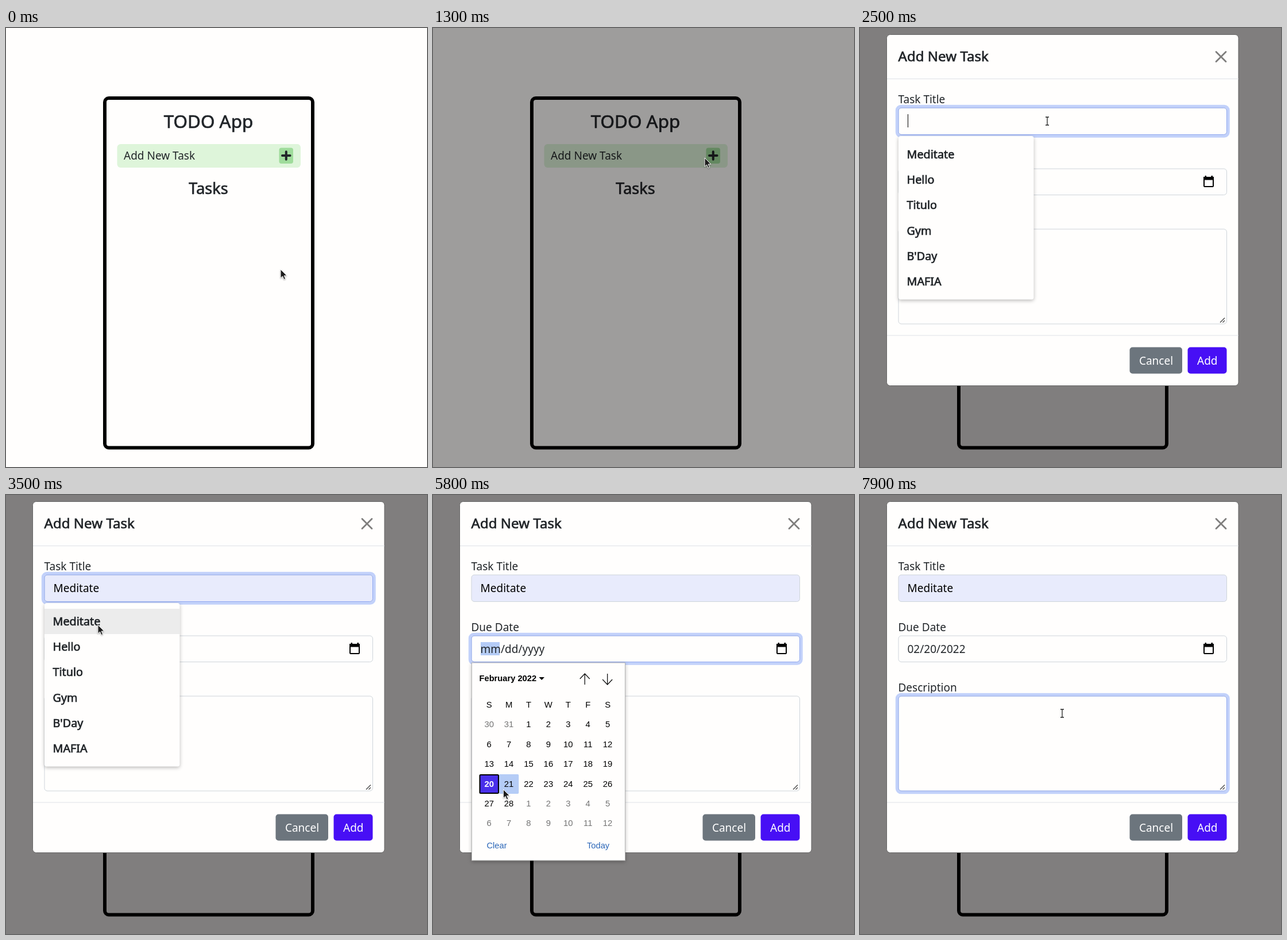
An HTML page for the animation above (8 s loop, 733x764 px).

```html
<!DOCTYPE html>
<html lang="en">
<head>
<meta charset="utf-8">
<title>Task list</title>
<style>
  html, body { margin: 0; width: 100%; height: 100%; overflow: hidden; background: #fffefd; }
  svg { display: block; width: 733px; height: 764px; }
  text { font: 19px "Noto Sans", "Open Sans", sans-serif; fill: #212529; white-space: pre; }
  .mid { text-anchor: middle; }
  .h1, .h2, .h3, .item { stroke: #212529; stroke-width: .7px; }
  .h1 { font-size: 31.4px; }
  .h2 { font-size: 27px; }
  .h3 { font-size: 24.1px; }
  .item { font-size: 19.8px; }
  .typed { fill: #000; }
  .btn { fill: #fff; }
  .line { stroke: #dee2e6; }
  .box { fill: #fffefd; stroke: #ced4da; }
  .ring { fill: none; stroke: #c2d1fa; stroke-width: 5px; }
  .edge { fill: none; stroke: #90a8f0; }
  .caret { fill: #000; }
  .pop { filter: drop-shadow(0 2px 3px rgba(0, 0, 0, .28)); }
  .cal text { font: 14.9px "Liberation Sans", Arial, sans-serif; fill: #000; }
  .cal .month { font-weight: bold; font-size: 14.7px; }
  .cal .other { fill: #757575; }
  .cal .link { fill: #2a66b8; font-size: 14.7px; }
  .cal .chosen { fill: #fff; font-weight: bold; }
  .thin { fill: none; stroke: #111; stroke-width: 1.3px; }
  #arrow { fill: #1c1c1c; stroke: #fff; filter: drop-shadow(0 1px 1px rgba(0, 0, 0, .35)); }
  #beam { fill: none; stroke: #222; stroke-width: 1.3px; }
</style>
</head>
<body>
<svg viewBox="0 0 733 764">
  <rect width="733" height="764" fill="#fffefd"/>

  <g id="app">
    <rect x="172" y="122" width="362" height="608.5" rx="7" fill="none" stroke="#000" stroke-width="6"/>
    <text class="h1 mid" x="352.5" y="173.5">TODO App</text>
    <rect x="193.5" y="202" width="319.5" height="41" rx="6" fill="#def5da"/>
    <text x="205" y="229">Add New Task</text>
    <rect x="475.5" y="208.5" width="24.5" height="27.5" rx="4" fill="#9fdc9b"/>
    <path d="M481 222h13.6M487.8 215.2v13.6" stroke="#212529" stroke-width="4" stroke-linecap="round"/>
    <text class="h2 mid" x="352.5" y="289">Tasks</text>
  </g>

  <rect id="shade" width="733" height="764" fill="#030100"/>

  <g id="modal">
    <rect x="46.5" y="11.5" width="612.5" height="611" rx="6" fill="#fffefd" stroke="#666"/>
    <text class="h3" x="66.5" y="58">Add New Task</text>
    <path d="M620 41.5l17 17m0-17l-17 17" stroke="#7f7e7d" stroke-width="2.8" stroke-linecap="round"/>
    <path class="line" d="M47 88.5h612M47 535h612"/>

    <text x="66.5" y="131">Task Title</text>
    <text x="66.5" y="237">Due Date</text>
    <text x="66.5" y="342">Description</text>
    <g id="fields"></g>

    <text id="title" class="typed" x="82.5" y="169">Meditate</text>
    <rect id="month" x="83" y="256" width="33" height="23" fill="#b5ccf6"/>
    <text id="date" x="82.5" y="274.5"></text>
    <rect x="599" y="260" width="16" height="16" rx="1" fill="none" stroke="#000" stroke-width="2"/>
    <path d="M598 259h18v5.5h-18zM600.5 257h2.5v3h-2.5zM611.5 257h2.5v3h-2.5z"/>
    <path d="M627 512.5l8-8M631.5 512.5l3.5-3.5" stroke="#444" stroke-width="1.3"/>
    <rect id="titleCaret" class="caret" x="83" y="150" width="1" height="23"/>
    <rect id="noteCaret" class="caret" x="83" y="362" width="1" height="22"/>

    <rect x="469.5" y="555.5" width="91.5" height="46" rx="5" fill="#6c757d"/>
    <text class="btn mid" x="515.5" y="586">Cancel</text>
    <rect x="570.5" y="555.5" width="68" height="46" rx="5" fill="#470ff5"/>
    <text class="btn mid" x="604.8" y="586">Add</text>
  </g>

  <g id="list">
    <rect class="pop" x="67" y="188" width="235.5" height="284.5" rx="4" fill="#fffefd"/>
    <rect id="hover" x="67" y="198" width="235.5" height="44" fill="#ececec"/>
  </g>

  <g id="cal" class="cal">
    <rect class="pop" x="67.5" y="292" width="267" height="344" fill="#fffefd" stroke="#b4b4b4"/>
    <text class="month" x="80.5" y="324">February 2022</text>
    <path d="M184.5 317h9.5l-4.75 5z"/>
    <path class="thin" d="M264.3 330v-19m-8.5 9l8.5-9l8.5 9M303.7 311v19m-8.5-9l8.5 9l8.5-9"/>
    <rect id="cell" y="486" width="34.4" height="34" rx="2" fill="#b5ccf6"/>
    <rect x="81.5" y="487" width="32.5" height="32" rx="1.5" fill="#4930ea" stroke="#000" stroke-width="2"/>
    <g id="days"></g>
    <text class="link" x="93.5" y="615">Clear</text>
    <text class="link" x="268" y="615">Today</text>
  </g>

  <g id="mouse">
    <path id="arrow" d="M0 0V15.2L3.6 12L6 17.6L8.6 16.5L6.2 11H11Z"/>
    <path id="beam" d="M-3-7h2.2l.8 .8l.8-.8h2.2M0-6.5V6.5M-3 7h2.2l.8-.8l.8 .8h2.2"/>
  </g>
</svg>

<script>
const LOOP = 8000, TICK = 100;   // the screen refreshes ten times a second
const CELL = 34.4, GRID_X = 80.5;
const $ = id => document.getElementById(id);

function add(parent, tag, attrs, text) {
  const el = document.createElementNS("http://www.w3.org/2000/svg", tag);
  for (const k in attrs) el.setAttribute(k, attrs[k]);
  if (text !== undefined) el.textContent = text;
  return parent.appendChild(el);
}

// A form field; returns its box and its focus ring
function field(y, h) {
  const rect = (parent, cls, out, rx) => add(parent, "rect", {
    class: cls, x: 67 - out, y: y - out, width: 571.5 + 2 * out, height: h + 2 * out, rx
  });
  const box = rect($("fields"), "box", 0, 5);
  const glow = add($("fields"), "g", {});
  rect(glow, "ring", 2.7, 7);
  rect(glow, "edge", 0, 5);
  return { box, glow };
}
const titleField = field(139, 46.5);
const dateField = field(245, 45.5);
const noteField = field(350, 165);

["Meditate", "Hello", "Titulo", "Gym", "B'Day", "MAFIA"].forEach((s, i) =>
  add($("list"), "text", { class: "item", x: 81.5, y: 227 + i * 44.2 }, s));

function dayText(col, y, text, cls = "") {
  add($("days"), "text", { class: "mid " + cls, x: GRID_X + (col + .5) * CELL, y }, text);
}
[..."SMTWTFS"].forEach((s, i) => dayText(i, 370, s));
for (let i = 0; i < 42; i++) {
  const day = new Date(2022, 0, 30 + i);
  const n = day.getDate(), inMonth = day.getMonth() === 1;
  const cls = !inMonth ? "other" : n === 20 ? "chosen" : "";
  dayText(i % 7, 404.3 + Math.floor(i / 7) * CELL, n, cls);
}

const ramp = (t, from, to) => Math.max(0, Math.min(1, (t - from) / (to - from)));
const easeOut = (p, power = 2) => 1 - (1 - p) ** power;
const show = (el, on) => { el.style.display = on ? "" : "none"; };
const fade = (el, v) => el.setAttribute("opacity", v);

// Mouse strokes, each slowing down towards its goal
const moves = [
  { from: 400, to: 900, x: 473, y: 226 },    // add button
  { from: 1600, to: 2100, x: 326, y: 162 },  // title field
  { from: 3100, to: 3500, x: 160, y: 226 },  // first suggestion
  { from: 3800, to: 4600, x: 605, y: 246 },  // date icon
  { from: 5100, to: 5500, x: 158, y: 508 },  // calendar
  { from: 5600, to: 5900, x: 118, y: 513 },
  { from: 6100, to: 6400, x: 89, y: 512 },   // chosen day
  { from: 6700, to: 7100, x: 352, y: 380 }   // description
];
function mouseAt(t) {
  let x = 478, y = 420;
  for (const m of moves) {
    const p = easeOut(ramp(t, m.from, m.to));
    x += (m.x - x) * p;
    y += (m.y - y) * p;
  }
  return [x, y];
}

const focused = (t, end) => ramp(t, end - 400, end);

function draw(t) {
  const within = (a, b) => t >= a && t < b;

  fade($("shade"), .5 * ramp(t, 1185, 1335));
  fade($("modal"), ramp(t, 1366, 1516));
  const lift = Math.round(62.5 * (1 - easeOut(ramp(t, 1366, 1666), 1.7)));
  $("modal").setAttribute("transform", `translate(0 ${-lift})`);

  const onDate = focused(t, 5200), onNote = focused(t, 7500);
  fade(titleField.glow, focused(t, 2400) - onDate);
  fade(dateField.glow, onDate - onNote);
  fade(noteField.glow, onNote);

  const filled = t >= 3300;
  titleField.box.style.fill = filled ? "#e8ebfc" : "";
  show($("title"), filled);
  show($("hover"), filled);
  show($("list"), within(2500, 3800));
  show($("titleCaret"), within(2300, 3000));
  show($("noteCaret"), within(7200, 7900));

  const calOpen = within(5000, 6700);
  show($("cal"), calOpen);
  show($("month"), calOpen);
  $("date").textContent = t < 6700 ? "mm/dd/yyyy" : "02/20/2022";

  const [x, y] = mouseAt(t);
  const col = Math.floor((x - GRID_X) / CELL);
  show($("cell"), y > 486 && col > 0);
  $("cell").setAttribute("x", GRID_X + col * CELL);

  const overText = t > 1600 && (y > 139 && y < 186 || y > 350 && !calOpen);
  show($("arrow"), !overText);
  show($("beam"), overText);
  $("mouse").setAttribute("transform", `translate(${x} ${y})`);
}

const start = performance.now();
function frame() {
  const t = (performance.now() - start) % LOOP;
  draw(Math.floor(t / TICK) * TICK);
  requestAnimationFrame(frame);
}
frame();
</script>
</body>
</html>
```
